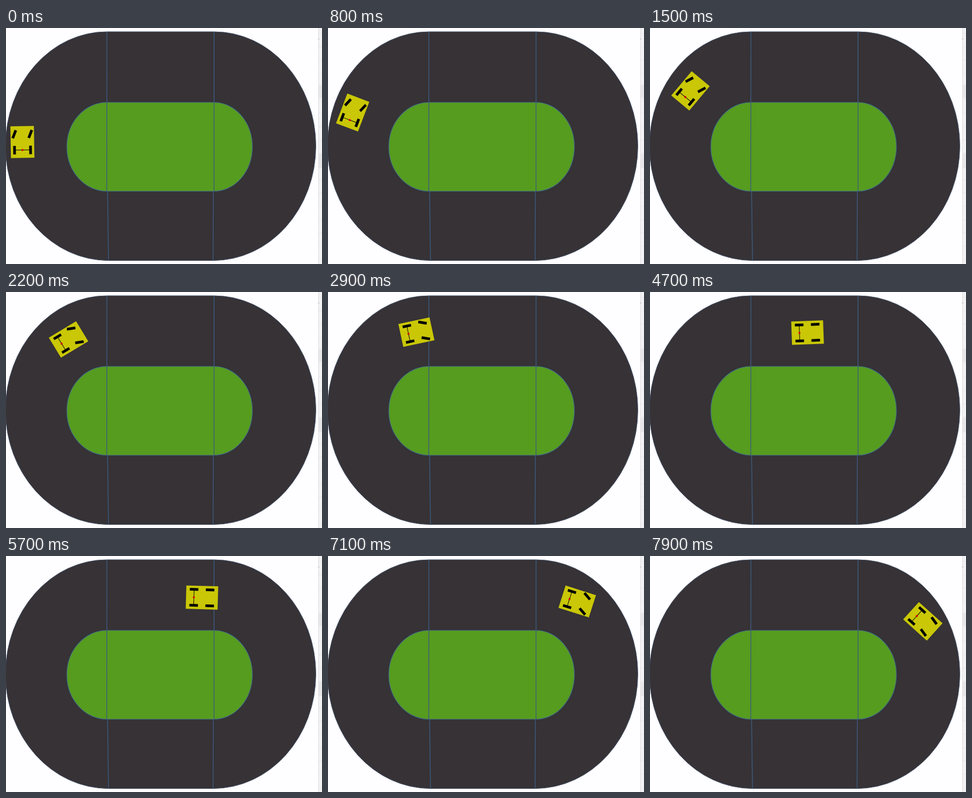
Write an HTML page that moves like this. It is 592x444 px and loops after 8 s.

```html
<!DOCTYPE html>
<html lang="en">
<head>
<meta charset="utf-8">
<title>Car on an oval track</title>
<style>
  html, body { margin: 0; width: 100%; height: 100%; overflow: hidden; background: #fefdff; }
  svg { display: block; width: 592px; height: 444px; }
  .line { fill: none; stroke: #3d5c80; stroke-width: 1.4; }
</style>
</head>
<body>
<svg viewBox="0 0 592 444">
  <defs>
    <rect id="wheel" x="-8" y="-2.5" width="16" height="5"/>
  </defs>
  <rect width="592" height="444" fill="#fefdff"/>

  <!-- side strip -->
  <rect x="585.5" width="6.5" height="444" fill="#f2f2f4"/>
  <path d="M589 107v25M589 237v27" stroke="#e7e7e9" stroke-width="6"/>
  <path d="M589 10v434" stroke="#e6e6e9" stroke-width="6" stroke-dasharray="1 24"/>
  <path d="M585.5 0v444" stroke="#dedee2"/>
  <rect x="585" y="20" width="2" height="1" fill="#999"/>

  <!-- track -->
  <path d="M189 7H390A190.5 215 0 0 1 580.5 222A192.5 215.5 0 0 1 388 437.5H192A193 215.5 0 0 1 -1 222A190 215 0 0 1 189 7Z"
        fill="#363236" stroke="#46566d"/>
  <path d="M189 140H389.5A72 83.5 0 0 1 389.5 307H189A75 83.5 0 0 1 189 140Z"
        fill="#569c1e" stroke="#41708a" stroke-width="1.2"/>
  <path class="line" d="M189 7L188.7 307M190.3 307L192 437.5M389.7 7V307M388.5 307L388 437.5"/>

  <!-- car, origin on the rear axle, nose towards +x -->
  <g id="car">
    <rect x="-14.7" y="-22" width="59.7" height="44" fill="#c9c706"/>
    <path d="M0-15V15" stroke="#000"/>
    <use href="#wheel" y="-15"/>
    <use href="#wheel" y="15"/>
    <use href="#wheel" class="front"/>
    <use href="#wheel" class="front"/>
    <circle r="2" fill="#d01010"/>
  </g>
</svg>
<script>
  const LOOP = 8, STEP = 0.1, DT = 0.01; // seconds
  const SPEED = 72;                      // px per second
  const START = { x: 31, y: 229.6, heading: -91 };
  const TURN_RATE = 27.2, OVERSHOOT = 6;  // degrees per second, degrees
  const STRAIGHT_AT = (OVERSHOOT - START.heading) / TURN_RATE;
  const BEND_AT = 6.85, BEND_END = 7.9, BEND_ANGLE = 42;

  const car = document.getElementById('car');
  const fronts = [...car.querySelectorAll('.front')];

  // steady bend, damped sway on the straight, then a bend that eases out
  function headingAt(t) {
    if (t < STRAIGHT_AT) return START.heading + TURN_RATE * t;
    if (t < BEND_AT) {
      const s = t - STRAIGHT_AT;
      return 0.4 + OVERSHOOT * Math.exp(-0.7 * s) * Math.cos(Math.PI * s);
    }
    const left = (BEND_END - t) / (BEND_END - BEND_AT);
    return BEND_ANGLE * (1 - left * left);
  }

  function steerAt(t) {
    if (t < STRAIGHT_AT) return 22;
    return t < BEND_AT ? 0 : 12 + 25 * (BEND_END - t);
  }

  // the rear axle always rolls along the heading
  function positionAt(t) {
    let { x, y } = START;
    for (let i = 0, n = Math.round(t / DT); i < n; i++) {
      const angle = headingAt((i + 0.5) * DT) * Math.PI / 180;
      x += SPEED * DT * Math.cos(angle);
      y += SPEED * DT * Math.sin(angle);
    }
    return { x, y };
  }

  function draw(seconds) {
    const t = Math.floor(seconds % LOOP / STEP) * STEP;
    const { x, y } = positionAt(t);
    car.setAttribute('transform', `translate(${x} ${y}) rotate(${headingAt(t)})`);
    fronts.forEach((wheel, i) =>
      wheel.setAttribute('transform', `translate(30 ${i ? 15 : -15}) rotate(${steerAt(t)})`));
  }

  const start = performance.now();
  function tick() {
    draw((performance.now() - start) / 1000);
    requestAnimationFrame(tick);
  }
  tick();
</script>
</body>
</html>
```
